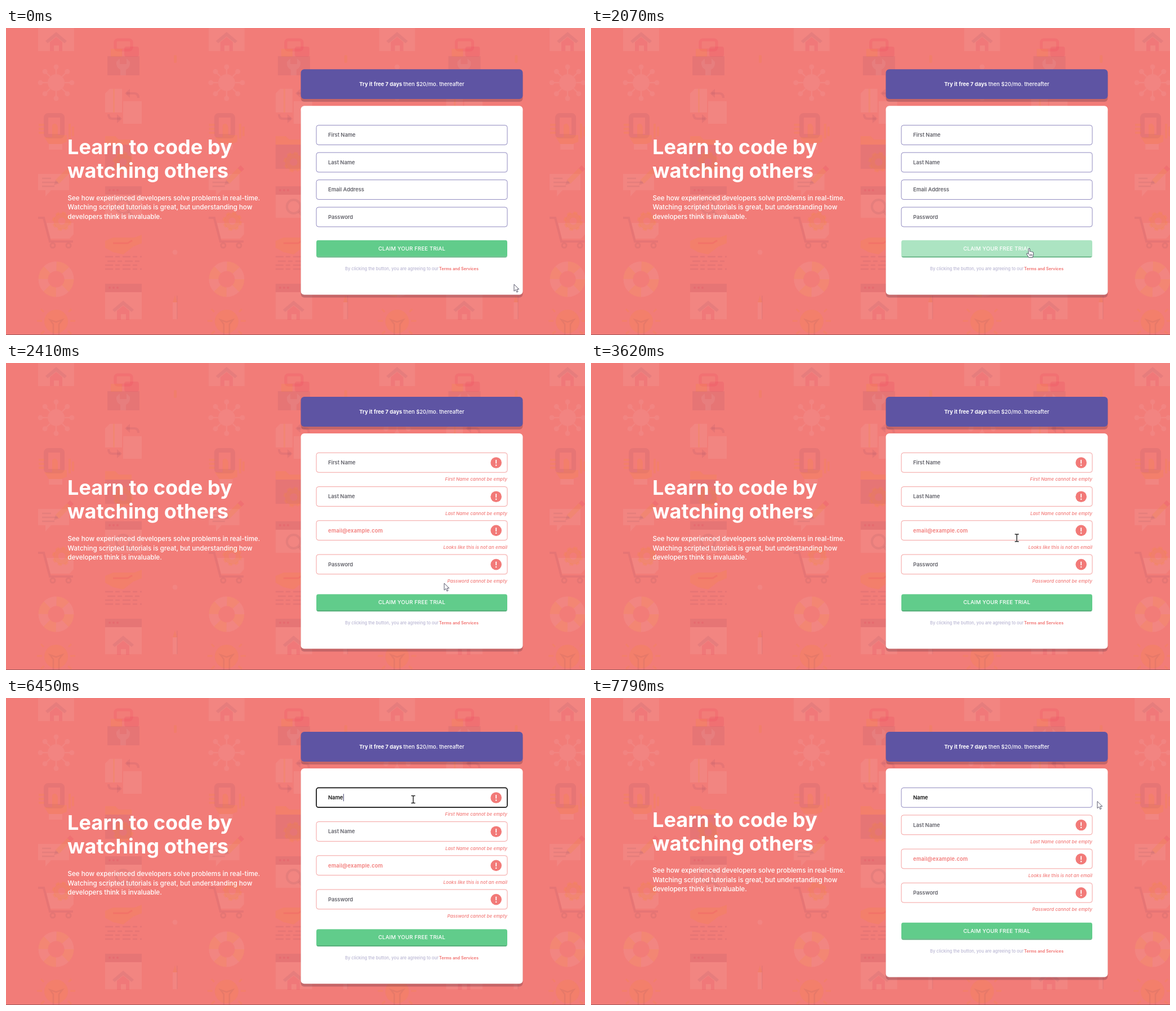
Animation, 1028 px wide and 545 px high, one loop 8000 ms. Source, as an HTML page with a canvas:

```html
<!DOCTYPE html>
<html lang="en">
<head>
<meta charset="utf-8">
<title>Sign-up form</title>
<style>
html, body { margin: 0; width: 100%; height: 100%; overflow: hidden; background: #f27c78; }
canvas { display: block; }
</style>
</head>
<body>
<canvas id="stage" width="1028" height="545"></canvas>
<script>
const W = 1028, H = 545, LOOP = 8000;
const CORAL = '#f27a78', GREEN = '#61cc8b', PURPLE = '#5e54a3';
const SUBMIT = 2140, FOCUS = 4710, BLUR = 7720;
const stage = document.getElementById('stage').getContext('2d');
let g = stage;

// Drawing helpers
function rect(color, x, y, w, h, r = 0) {
  g.fillStyle = color;
  g.beginPath();
  g.roundRect(x, y, w, h, r);
  g.fill();
}
function frame(color, x, y, w, h, r, line) {
  g.strokeStyle = color;
  g.lineWidth = line;
  g.beginPath();
  g.roundRect(x, y, w, h, r);
  g.stroke();
}
function disc(color, x, y, r) {
  g.fillStyle = color;
  g.beginPath();
  g.arc(x, y, r, 0, 7);
  g.fill();
}
function ring(color, x, y, r, line, dash = []) {
  g.strokeStyle = color;
  g.lineWidth = line;
  g.setLineDash(dash);
  g.beginPath();
  g.arc(x, y, r, 0, Math.PI * 2);
  g.stroke();
  g.setLineDash([]);
}
function shape(color, d) {
  g.fillStyle = color;
  g.fill(new Path2D(d));
}
function line(color, width, d) {
  g.strokeStyle = color;
  g.lineWidth = width;
  g.stroke(new Path2D(d));
}
function text(str, x, y, size, weight, color, align = 'left', spacing = 0, style = '') {
  g.font = `${style} ${weight} ${size}px Inter, "Open Sans", sans-serif`;
  g.letterSpacing = spacing + 'px';
  g.textAlign = align;
  g.fillStyle = color;
  g.fillText(str, x, y);
}

// Faint icon wallpaper
const DARK = 'rgba(130,70,90,.11)', LIGHT = 'rgba(240,180,180,.15)',
      ORANGE = 'rgba(240,140,50,.18)', RED = 'rgba(235,60,90,.18)';

function gear(x, y, r) {
  ring(ORANGE, x, y, r * .65, r * .5);
  ring(ORANGE, x, y, r * .95, r * .25, [r * .42, r * .327]);
}
function house(x, y) {
  shape(RED, `M${x - 11} ${y + 18}L${x} ${y + 9}L${x + 11} ${y + 18}V${y + 34}H${x + 5}V${y + 24}H${x - 4}V${y + 34}H${x - 11}Z`);
  shape(DARK, `M${x - 19} ${y + 16}L${x} ${y}L${x + 19} ${y + 16}L${x + 15} ${y + 20}L${x} ${y + 8}L${x - 15} ${y + 20}Z`);
}
function browser(y, h) {
  rect(DARK, 176, y, 65, 15);
  for (const x of [184, 191, 198]) disc(RED, x, y + 7, 2);
  rect(LIGHT, 176, y + 15, 65, h);
}
function leftIcons() {
  rect(LIGHT, 57, -10, 64, 51);
  house(89, 7);

  disc(LIGHT, 89, 97, 15);
  for (let i = 0; i < 8; i++) {
    const a = i * Math.PI / 4, c = Math.cos(a), s = Math.sin(a);
    line(LIGHT, 2.5, `M${89 + c * 15} ${97 + s * 15}L${89 + c * 24} ${97 + s * 24}`);
    disc(LIGHT, 89 + c * 28, 97 + s * 28, 4.5);
  }

  frame(DARK, 71, 155, 29, 37, 4, 8);
  line(ORANGE, 4, 'M58 172H68M58 179H68M58 186H68M113 170V196M119 175V192');
  shape(ORANGE, 'M82 172Q89 166 92 176V190H108V202L98 206H76L68 194H82Z');
  rect(LIGHT, 76, 206, 24, 10);

  shape(LIGHT, 'M57 259H112V288H80L70 299V288H57Z');
  line(DARK, 2.5, 'M64 267H80M64 274H92M64 281H86');
  line(ORANGE, 9, 'M91 273L112 252');
  line(RED, 9, 'M112 252L117 247');
  shape(DARK, 'M88 270L94 276L85 279Z');

  line(DARK, 4, 'M57 337H67L78 379H119');
  shape(LIGHT, 'M72 346H120V366L113 374H79Z');
  gear(99, 343, 16);
  ring(DARK, 83, 386, 4, 3);
  ring(DARK, 111, 386, 4, 3);

  ring(LIGHT, 89, 446, 23, 17);
  ring(ORANGE, 89, 446, 23, 17, [18.06, 18.06]);

  disc(ORANGE, 89, 521, 21);
  line(DARK, 2.5, 'M84 545V526L78 518L89 522L100 518L94 526V545');
  line(ORANGE, 3, 'M55 520H64M114 520H123M62 499L67 504M116 499L111 504M62 543L68 538M116 543L110 538');
}
function rightIcons() {
  frame(RED, 194, 21, 29, 18, 4, 5);
  rect(ORANGE, 186, 37, 20, 14);
  rect(RED, 210, 33, 26, 18, 4);
  rect(DARK, 180, 50, 57, 34);
  shape(LIGHT, 'M203 84V74Q195 70 196 60L202 54V64H214V54L220 60Q221 70 213 74V84Z');

  shape(LIGHT, 'M176 116L184 108H206V150H176Z');
  shape(LIGHT, 'M208 130H241V170H208Z');
  rect(ORANGE, 190, 108, 3, 42);
  line(DARK, 4, 'M214 116H228Q235 116 235 124M203 161H189Q182 161 182 153');
  shape(DARK, 'M211 116L220 108V124ZM206 161L197 153V169Z');

  shape(ORANGE, 'M176 192H194L200 198H223V207H176Z');
  rect(DARK, 176, 207, 47, 43);
  gear(208, 238, 17);

  browser(281, 41);
  ring(DARK, 208, 317, 12, 4);
  line(DARK, 5, 'M217 326L227 336');

  shape(ORANGE, 'M176 378L190 372H228L241 367V382L226 388L208 402L190 398L176 390Z');
  line(RED, 3, 'M190 382H216L224 377');
  g.setLineDash([14, 4, 8, 5]);
  line(DARK, 2.5, 'M176 406H241M180 414H241M176 421H236M176 428H241');
  g.setLineDash([]);

  browser(454, 48);
  house(208, 484);

  rect(ORANGE, 298, 48, 5, 14, 2);
  disc(LIGHT, 300, 398, 4.5);
  rect(LIGHT, 296, 487, 8, 30);
  shape(ORANGE, 'M296 487L300 475L304 487Z');
  rect(DARK, 303, 475, 1.5, 42);
}
function wallpaper() {
  const sheet = new OffscreenCanvas(W, H);
  g = sheet.getContext('2d');
  rect('#f27c78', 0, 0, W, H);
  for (let i = 0; i < 4; i++) {
    g.setTransform(1, 0, 0, 1, i * 302.7, 0);
    leftIcons();
    rightIcons();
  }
  g.setTransform(1, 0, 0, 1, 0, 0);
  rect('rgba(80,50,60,.5)', 0, 544, W, 1);
  g = stage;
  return sheet;
}
const backdrop = wallpaper();

// Motion: start, end, steps, from, to
const moves = [
  [70, 840, 12, [902, 455], [834, 396]],
  [910, 1270, 6, [834, 396], [778, 391]],
  [3210, 3970, 12, [780, 388], [732, 233]],
  [4040, 4510, 8, [732, 233], [723, 180]],
  [6980, 7320, 6, [723, 180], [899, 183.5]]
];
function pointer(t) {
  let pos = moves[0][3];
  for (const [start, end, steps, from, to] of moves) {
    if (t < start) break;
    const step = Math.floor((t - start) / (end - start) * (steps - 1) + .05) + 1;
    const k = Math.min(1, step / steps);
    pos = from.map((v, i) => v + (to[i] - v) * k);
  }
  return pos;
}
const glow = [[0, 1], [630, 1], [770, .69], [840, .62], [2040, .62], [2200, .13], [2410, 1]];
function ramp(keys, t) {
  const i = keys.findIndex(k => k[0] > t);
  if (i < 0) return keys[keys.length - 1][1];
  const [a, va] = keys[i - 1], [b, vb] = keys[i];
  return va + (vb - va) * (t - a) / (b - a);
}
const typed = t => t < 5780 ? '' : 'Name'.slice(0, Math.max(1, Math.floor((t - 5850) / 200) + 1));
const caretOn = t => (t >= 4780 && t < 5250) || (t >= 5780 && t < 6980) || (t >= 7520 && t < BLUR);

const fields = [
  ['First Name', 'First Name cannot be empty'],
  ['Last Name', 'Last Name cannot be empty'],
  ['Email Address', 'Looks like this is not an email'],
  ['Password', 'Password cannot be empty']
];

function layout(t) {
  const sent = t >= SUBMIT;
  const errors = fields.map((_, i) => sent && (i > 0 || t < BLUR));
  let y = sent ? 159.4 : 172.6;
  const top = y;
  const rows = errors.map(bad => {
    const row = y;
    y += bad ? 60.2 : 48.5;
    return row;
  });
  return { errors, rows, top, button: y + 10, shift: !sent ? 0 : t < BLUR ? 10.4 : 4.6 };
}

function headline(dy) {
  text('Learn to code by', 109, 224 + dy, 36.1, 700, '#fff');
  text('watching others', 109, 266 + dy, 36.1, 700, '#fff');
  ['See how experienced developers solve problems in real-time.',
   'Watching scripted tutorials is great, but understanding how',
   'developers think is invaluable.']
    .forEach((s, i) => text(s, 109.5, 305.8 + dy + i * 16.4, 11.6, 500, '#fff'));
}
function panel(color, y, h) {
  rect('rgba(80,40,60,.28)', 523.5, y + 5, 394, h, 6);
  rect(color, 523.5, y, 394, h, 6);
}
function field(i, y, bad, t) {
  const [hint, error] = fields[i], mid = y + 17.4;
  const focused = i === 0 && t >= FOCUS && t < BLUR;
  if (!focused) frame(bad ? '#f4a09f' : '#8f89bf', 551, y, 339, 34.8, 4, 1);
  if (focused || (i === 0 && t >= BLUR && t < BLUR + 70)) {
    const partial = t < FOCUS + 70 || t >= BLUR;
    frame(partial ? 'rgba(16,16,16,.5)' : '#101010', 551, y, 339, 34.8, 4, 1.7);
  }
  const value = i === 0 ? typed(t) : '';
  if (value) text(value, 572, mid + 3.3, 9.3, 600, '#111');
  else if (i === 2 && bad) text('email@example.com', 572, mid + 3.3, 9.3, 600, CORAL, 'left', .2);
  else text(hint, 572, mid + 3.3, 9.3, 600, '#62626a');
  if (i === 0 && caretOn(t)) {
    const x = 572 + (value ? g.measureText(value).width + .5 : 0);
    rect('#3d3a6b', x, mid - 6.5, 1, 13);
  }
  if (bad) {
    disc(CORAL, 870.2, mid + .2, 9.8);
    rect('#fff', 869.3, mid - 5, 1.8, 7, .8);
    disc('#fff', 870.2, mid + 4.7, 1.2);
    text(error, 890, y + 50, 8.15, 500, CORAL, 'right', 0, 'italic');
  }
}
function button(y, t) {
  const level = ramp(glow, t);
  g.save();
  g.beginPath();
  g.roundRect(551, y, 339, 31, 4);
  g.clip();
  g.globalAlpha = level;
  rect(GREEN, 551, y, 339, 28.8);
  g.globalAlpha = t < 2070 ? level : 1;
  rect('#58b07c', 551, y + 28.8, 339, 2.4);
  g.restore();
  text('CLAIM YOUR FREE TRIAL', 720.5, y + 18.1, 9.5, 500, '#fff', 'center', .2);
}

// Cursors
const ARROW = 'M0 0V12.2L2.9 9.6L4.9 14L7 13L5 8.8H8.9Z';
const HAND = 'M-1.2 9V1Q0 -.6 1.2 1V6Q2.4 4.8 3.4 6.3Q4.8 5.3 5.6 6.9Q7.6 6.2 7.5 8.5V12L6 16.5H-.6L-4.6 10.4Q-4.6 8.4 -2.8 9L-1.2 10.5Z';
function cursor(t, view) {
  const [x, y] = pointer(t);
  const inside = (top, h) => x > 551 && x < 890 && y > top && y < top + h;
  g.save();
  g.translate(x, y);
  if (view.rows.some(row => inside(row, 35))) {
    line('#fff', 3, 'M0 -6V6');
    line('#222', 1.4, 'M-3.5 -6.5H-1Q0 -6.3 0 -5V5Q0 6.3 -1 6.5H-3.5M3.5 -6.5H1Q0 -6.3 0 -5V5Q0 6.3 1 6.5H3.5');
  } else {
    const d = inside(view.button, 31) ? HAND : ARROW;
    shape('#fff', d);
    line('#45435a', .9, d);
    if (d === HAND) line('#45435a', .8, 'M1 10V14M3 10V14M5 10V14');
  }
  g.restore();
}

function draw(t) {
  const view = layout(t), { top, button: by } = view;
  g.drawImage(backdrop, 0, 0);
  headline(view.shift);
  panel(PURPLE, top - 99.3, 52.8);
  text('Try it free 7 days', 627.3, top - 69.6, 9.35, 700, '#fff');
  text('then $20/mo. thereafter', 813.6, top - 69.6, 9.45, 500, '#fff', 'right');
  panel('#fff', top - 34.4, by + 97 - top + 34.4);
  view.rows.forEach((y, i) => field(i, y, view.errors[i], t));
  button(by, t);
  text('By clicking the button, you are agreeing to our', 602, by + 53.4, 7.55, 500, '#b9b6d3');
  text('Terms and Services', 839, by + 53.4, 7.25, 700, CORAL, 'right');
  cursor(t, view);
}

const begin = performance.now();
function tick() {
  draw((performance.now() - begin) % LOOP);
  requestAnimationFrame(tick);
}
tick();
</script>
</body>
</html>
```
